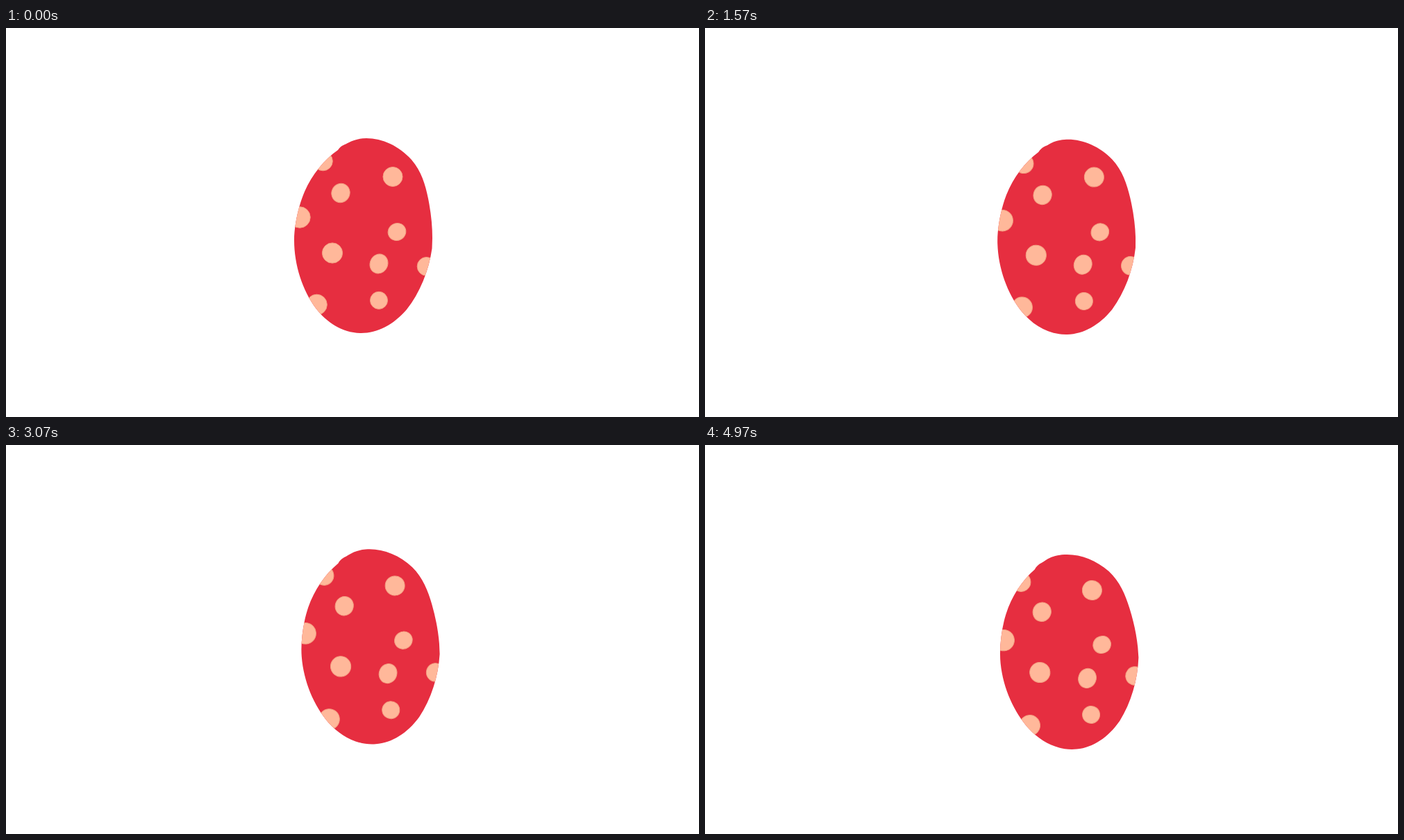
Write an HTML page that moves like this. It is 998 px wide and 561 px high and loops after 5010 ms.

```html
<!DOCTYPE html>
<html lang="en">
<head>
<meta charset="utf-8">
<title>Wobbling egg</title>
<style>
  html, body { margin: 0; width: 100%; height: 100%; overflow: hidden; background: #fff; }
  svg { display: block; width: 100%; height: 100%; }
  .shell { fill: #e62e40; }
  .dots { fill: #ffb89a; stroke: #f4a083; stroke-width: 1; }
</style>
</head>
<body>
<svg viewBox="0 0 998 561">
  <defs>
    <path id="shell" d="M519 159C542 159 566 170 584 190C598 206 604 226 608 246
      C612 266 614 285 614 303L613.5 318C609 350 596 382 577 406C558 428 535 440 511.5 440
      C485 440 462 425 446 404C427 378 415 342 415 306C415 285 421 257 430 236
      C441 211 458 190 478 176C483 168.5 489 168 493 165.5C501 161 510 159 519 159Z"/>
    <clipPath id="inside"><use href="#shell"/></clipPath>
  </defs>
  <g id="egg">
    <use href="#shell" class="shell"/>
    <g class="dots" clip-path="url(#inside)">
      <circle cx="557" cy="214.5" r="14"/>
      <ellipse cx="482" cy="238" rx="13" ry="13.8" transform="rotate(25 482 238)"/>
      <ellipse cx="563" cy="294" rx="13" ry="12.3" transform="rotate(-30 563 294)"/>
      <circle cx="470" cy="324.5" r="14.6"/>
      <ellipse cx="537" cy="340" rx="12.7" ry="14.2" transform="rotate(25 537 340)"/>
      <circle cx="537" cy="392.8" r="12.5"/>
      <circle cx="447.5" cy="399" r="14.8"/>
      <circle cx="423" cy="273" r="15.2"/>
      <circle cx="456.5" cy="192" r="13.8"/>
      <circle cx="605.5" cy="343.8" r="13.3"/>
    </g>
  </g>
</svg>
<script>
  const LOOP = 5010, FPS = 30, LAST = 149;

  // Turning points [ms, px] of the sway and the bob.
  const sway = [
    [0, 0], [390, 16], [870, -18], [1090, -4], [1580, 6], [1850, -7], [2130, -1],
    [2700, -15.5], [3080, 10], [3370, -19], [3800, 8], [4360, -11.2], [4840, 13], [5200, 0]];
  const bob = [
    [0, 0], [670, -4.5], [1300, 6], [1900, -4], [2090, 4], [2330, -9],
    [2590, 5], [2920, -10], [3520, 0.5], [4200, -8], [4620, 7], [4960, -1], [5200, 0]];

  // Cosine easing from one turning point to the next.
  function glide(points, t) {
    const i = points.findIndex(p => p[0] > t);
    const [t0, a] = points[i - 1], [t1, b] = points[i];
    return a + (b - a) * (1 - Math.cos(Math.PI * (t - t0) / (t1 - t0))) / 2;
  }

  // The egg leans against its sway, with a slow wander on top.
  function lean(x, t) {
    const w = 1.05 * t / 1000;
    return -0.46 * x + 1.1 * Math.sin(w) + 0.8 * Math.sin(2 * w);
  }

  const egg = document.getElementById('egg');
  const start = performance.now();

  function draw() {
    const tick = Math.floor((performance.now() - start) % LOOP / 10);
    const step = Math.min(LAST, Math.floor((tick + 0.5) * FPS / 100));
    const t = step * 1000 / FPS;
    const x = glide(sway, t), y = glide(bob, t);
    egg.setAttribute('transform', `translate(${x} ${y}) rotate(${lean(x, t)} 514.5 299)`);
    requestAnimationFrame(draw);
  }
  draw();
</script>
</body>
</html>
```
